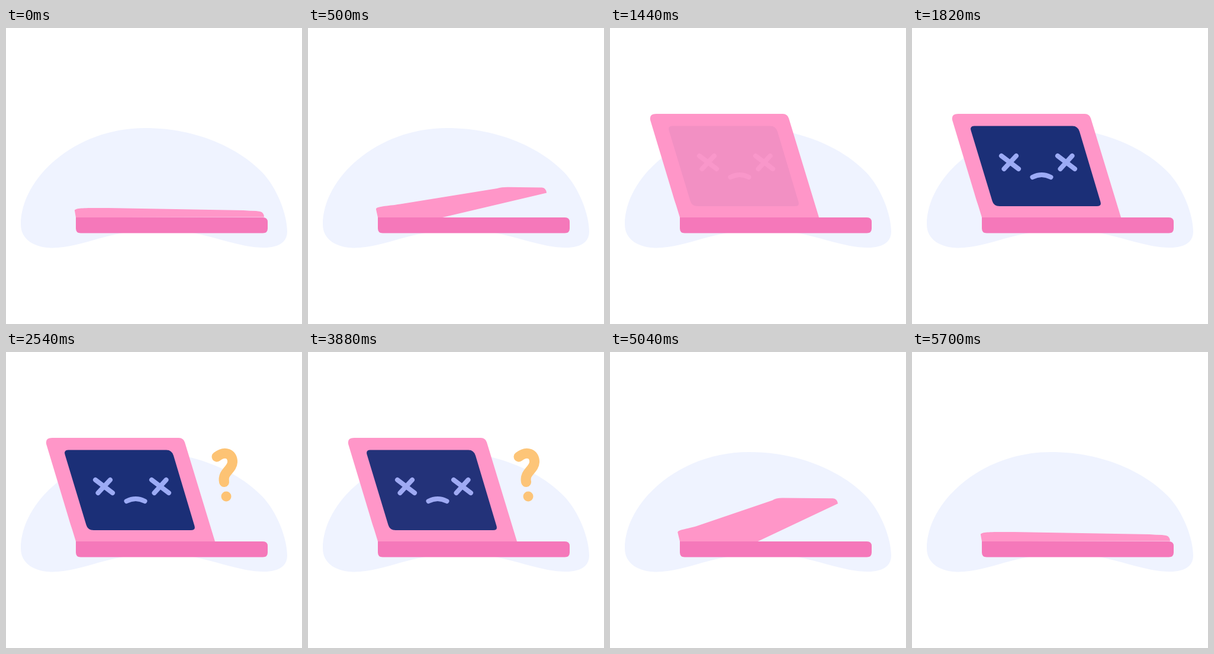
Write an HTML page that moves like this. It is 500 px wide and 500 px high and loops after 6.02 s.

```html
<!DOCTYPE html>
<html lang="en">
<head>
<meta charset="utf-8">
<title>Sad laptop</title>
<style>
  html, body { margin: 0; height: 100%; overflow: hidden; background: #fff; }
  svg { display: block; width: 100vw; height: 100vh; }
  .line { fill: none; stroke-linecap: round; stroke-linejoin: round; }
</style>
</head>
<body>
<svg viewBox="0 0 500 500">
  <path fill="#eff3ff" d="M25 332C25 255 115 169 235 169C325 169 395 205 432 243C458 270 475 315 475 344C475 362 460 371 436 371C395 371 355 352 300 343L252 341C175 341 130 371 78 371.5C48 371.5 25 357 25 332Z"/>
  <path id="lid" fill="#ff96c8"/>
  <path fill="#f578ba" d="M118 320H434q8 0 8 8V338.500q0 8-8 8H126q-8 0-8-8Z"/>
  <g id="screen">
    <path fill="#1b2f77" d="M105 165.500H271Q280 165.500 283 175L318.500 294Q320.500 301 313 301H148Q138 301 135.500 292L99.500 173Q97.500 165.500 105 165.500Z"/>
    <path class="line" stroke="#9cabf5" stroke-width="8" d="M151 216L180 238M176 216L155.500 238M246 216L275 238M270.500 216L250.500 238M203.500 252Q219 244 234.500 252"/>
  </g>
  <g id="question">
    <path class="line" stroke="#fdc374" stroke-width="17" d="M356 177C370 166 383 172 382.500 186C382 199 365 203 368.500 219.500"/>
    <circle cx="372" cy="244" r="8.500" fill="#fdc374"/>
  </g>
</svg>
<script>
  const LOOP = 6020;
  const lid = document.getElementById('lid');
  const screenGroup = document.getElementById('screen');
  const question = document.getElementById('question');

  // Lid outline: path command, then points as [open x, open y, closed x, closed y].
  const outline = [
    ['M', [118, 320, 118, 320]],
    ['L', [111.9, 300, 116, 308.5]],
    ['C', [110.7, 296, 115, 303], [109, 292, 142, 304], [105, 278, 172, 304]],
    ['L', [68.5, 157, 401, 308]],
    ['Q', [65, 145, 412, 309], [78, 145, 422, 309]],
    ['L', [292, 145, 429, 310]],
    ['Q', [299.5, 145, 435.5, 311], [302, 152.5, 436, 319.5]],
    ['L', [353, 320, 186, 320]]
  ];

  const ramp = (t, start, end) => Math.min(1, Math.max(0, (t - start) / (end - start)));

  // Ease with flat ends; x1 and x2 are the horizontal handle positions.
  function ease(u, x1, x2) {
    let lo = 0, hi = 1, s = 0.5;
    for (let i = 0; i < 24; i++) {
      const r = 1 - s;
      if (3 * x1 * s * r * r + 3 * x2 * s * s * r + s ** 3 < u) lo = s;
      else hi = s;
      s = (lo + hi) / 2;
    }
    return s * s * (3 - 2 * s);
  }

  function lidPath(closed) {
    const mix = ([x, y, cx, cy]) =>
      `${(x + (cx - x) * closed).toFixed(2)} ${(y + (cy - y) * closed).toFixed(2)}`;
    return outline.map(([cmd, ...points]) => cmd + points.map(mix).join(' ')).join('') + 'Z';
  }

  function draw(t) {
    const closed = t < 3000
      ? 1 - ease(ramp(t, 0, 1200), 0.53, 0.7)
      : ease(ramp(t, 4500, 5700), 0.28, 0.4);
    const fadeOut = 1 - ramp(t, 3860, 4460);
    lid.setAttribute('d', lidPath(closed));
    screenGroup.setAttribute('opacity', ramp(t, 1420, 1820) * fadeOut);
    question.setAttribute('opacity', ramp(t, 1940, 2540) * fadeOut);
  }

  const start = performance.now();
  function tick() {
    draw((performance.now() - start) % LOOP);
    requestAnimationFrame(tick);
  }
  tick();
</script>
</body>
</html>
```
